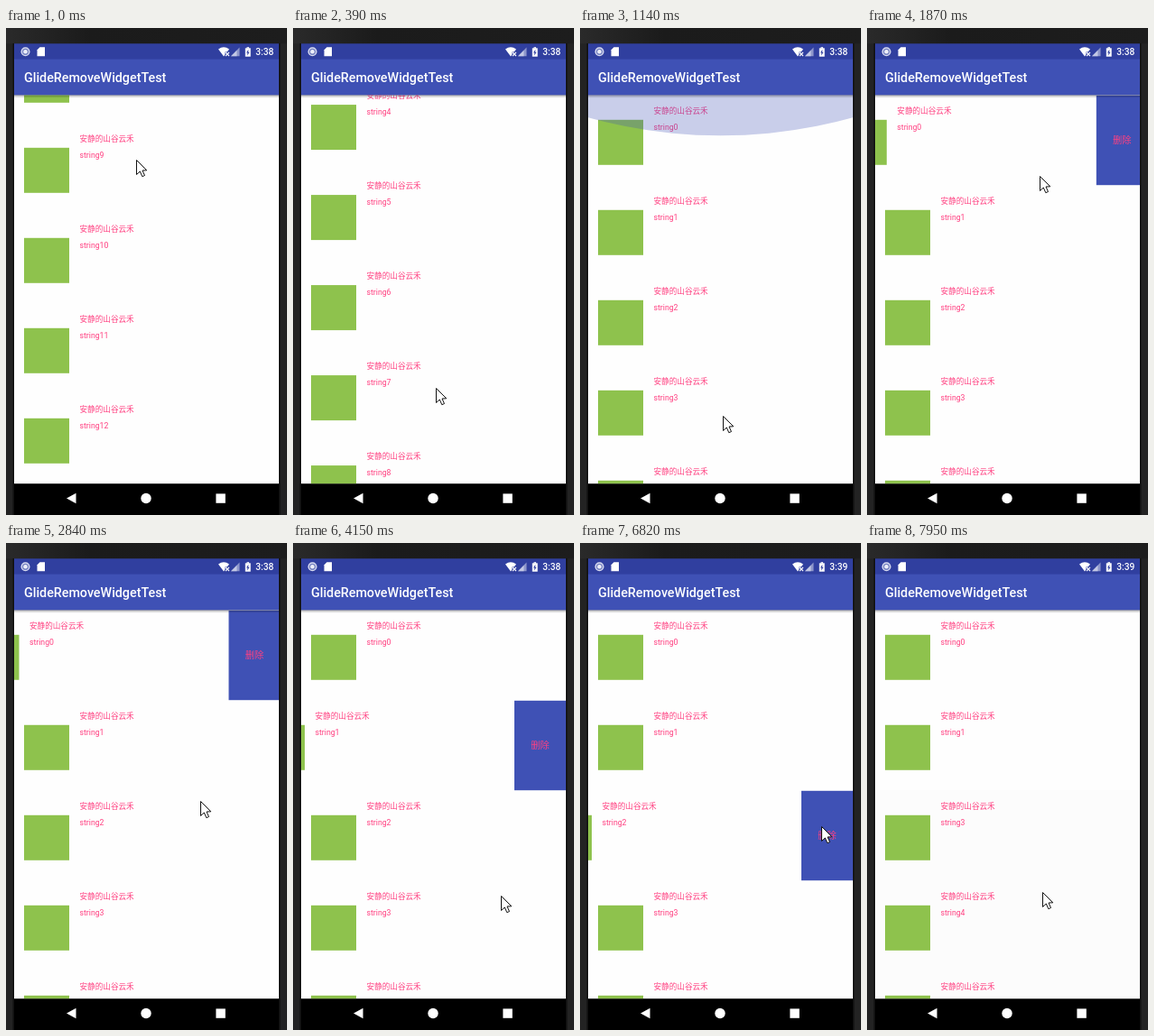
Animation of 311 by 540 pixels, one loop 8000 ms. Source, as an HTML page with a canvas:

```html
<!DOCTYPE html>
<html lang="zh">
<head>
<meta charset="utf-8">
<style>
html, body { margin: 0; width: 100%; height: 100%; overflow: hidden; background: #1d1d1d; }
canvas { display: block; }
</style>
</head>
<body>
<canvas id="stage" width="311" height="540"></canvas>
<script>
const ctx = document.getElementById('stage').getContext('2d');
const LOOP = 8000;
const LEFT = 9, WIDTH = 293, RIGHT = LEFT + WIDTH;
const STATUS_TOP = 17.3, BAR_TOP = 34.6, LIST_TOP = 74.3, NAV_TOP = 505.4;
const ROW = 100, PANEL = 57;
const INDIGO = '#3f51b5', DARK_INDIGO = '#303f9f', PINK = '#ff4081', WHITE = '#fff';
const LATIN = 'Roboto, sans-serif';
const CJK = '"Noto Sans CJK SC", "Noto Sans CJK", sans-serif';

// Bursts of activity: first refresh, last refresh, number of refreshes.
const BURSTS = [[150, 1140, 9], [1290, 1420, 2], [1720, 2150, 4], [2450, 3380, 8],
  [3530, 4150, 6], [4430, 5420, 8], [5540, 6510, 7], [7410, 7950, 5]];

// Turning points of the pointer: time, x, y.
const POINTER = [[0, 144, 146], [390, 158, 400], [650, 165, 154], [1140, 158, 430],
  [1420, 240, 150], [2150, 165, 171], [2840, 215, 286], [3380, 245, 225],
  [3780, 2, 240], [4150, 230, 391], [5000, 225, 141], [5420, 250, 310],
  [5860, 150, 320], [6510, 267, 314], [7680, 267, 314], [7950, 194, 387]];

// Per row: opening starts, opening ends, closing starts.
const SWIPES = [[1420, 2010, 2810], [3380, 3780, 4430], [5420, 5860, Infinity]];
const CLOSE_TIME = 400;

const mix = (a, b, k) => a + (b - a) * k;

function ease(t, from, to) {
  const k = Math.min(1, Math.max(0, (t - from) / (to - from)));
  return k * k * (3 - 2 * k);
}

function holdTime(time) {
  const burst = BURSTS.filter(b => b[0] <= time).pop();
  if (!burst) return 0;
  const [start, end, count] = burst;
  const step = (end - start) / (count - 1);
  return Math.min(end, start + Math.floor((time - start) / step + 0.12) * step);
}

function pointerAt(t) {
  const i = POINTER.findIndex(key => key[0] >= t);
  if (i <= 0) return POINTER[0].slice(1);
  const [t0, x0, y0] = POINTER[i - 1], [t1, x1, y1] = POINTER[i];
  const k = ease(t, t0, t1);
  return [mix(x0, x1, k), mix(y0, y1, k)];
}

function scrollAt(t) {
  return t < 660 ? mix(869, 202, ease(t, 0, 640)) : 202 * (1 - ease(t, 660, 1020));
}

function swipeAt(row, t) {
  if (!SWIPES[row]) return 0;
  const [start, end, close] = SWIPES[row];
  return PANEL * (t < close ? ease(t, start, end) : 1 - ease(t, close, close + CLOSE_TIME));
}

function rect(x, y, w, h, color) {
  ctx.fillStyle = color;
  ctx.fillRect(x, y, w, h);
}

function shape(points, fill, stroke) {
  ctx.beginPath();
  for (const [x, y] of points) ctx.lineTo(x, y);
  ctx.closePath();
  ctx.fillStyle = fill;
  ctx.fill();
  if (stroke) {
    ctx.strokeStyle = stroke;
    ctx.lineWidth = 1;
    ctx.stroke();
  }
}

function disc(x, y, r, color) {
  ctx.beginPath();
  ctx.arc(x, y, r, 0, Math.PI * 2);
  ctx.fillStyle = color;
  ctx.fill();
}

function text(str, x, y, font, color) {
  ctx.font = font;
  ctx.fillStyle = color;
  ctx.fillText(str, x, y);
}

function drawRow(n, y, swipe) {
  const x = -swipe;
  rect(20 + x, y + 27.5, 50, 50, '#8ec24d');
  text('安静的山谷云禾', 81.5 + x, y + 20.6, '300 8.6px ' + CJK, PINK);
  text('string' + n, 81.5 + x, y + 38.4, '8.7px ' + LATIN, PINK);
  if (swipe > 0) {
    rect(RIGHT + x, y + 0.5, PANEL, ROW - 0.6, INDIGO);
    text('删除', RIGHT + x + 18.2, y + 53.5, '300 10.3px ' + CJK, PINK);
  }
}

function drawList(t) {
  const scroll = scrollAt(t);
  const gap = ROW * ease(t, 7400, 7820);
  ctx.save();
  ctx.beginPath();
  ctx.rect(LEFT, LIST_TOP, WIDTH, NAV_TOP - LIST_TOP);
  ctx.clip();
  rect(LEFT, 74, WIDTH, 432, '#fefefe');
  if (gap > 0) rect(LEFT, LIST_TOP + 2 * ROW, WIDTH, 240, '#fcfcfc');

  for (let n = 0; n < 14; n++) {
    const y = LIST_TOP + n * ROW - scroll - (n > 2 ? gap : 0);
    if (y < LIST_TOP - ROW || y > NAV_TOP) continue;
    ctx.globalAlpha = n === 2 ? 1 - ease(t, 7300, 7500) : 1;
    drawRow(n, y, swipeAt(n, t));
  }
  ctx.globalAlpha = 1;

  const glow = 45 * ease(t, 900, 1140) * (1 - ease(t, 1140, 1420));
  if (glow > 0) disc(155.5, LIST_TOP + glow - 546, 546, 'rgba(63,81,181,0.28)');

  const shadow = ctx.createLinearGradient(0, LIST_TOP, 0, LIST_TOP + 3.5);
  shadow.addColorStop(0, 'rgba(0,0,0,0.3)');
  shadow.addColorStop(1, 'rgba(0,0,0,0)');
  rect(LEFT, LIST_TOP, WIDTH, 3.5, shadow);
  ctx.restore();
}

function drawWifi() {
  ctx.beginPath();
  ctx.moveTo(241, 31.5);
  ctx.lineTo(235, 23.5);
  ctx.quadraticCurveTo(241, 18.8, 247, 23.5);
  ctx.fillStyle = WHITE;
  ctx.fill();
  rect(242.5, 26.5, 5, 5, DARK_INDIGO);
  ctx.beginPath();
  ctx.moveTo(243, 27);
  ctx.lineTo(247, 31);
  ctx.moveTo(247, 27);
  ctx.lineTo(243, 31);
  ctx.strokeStyle = WHITE;
  ctx.lineWidth = 1.1;
  ctx.stroke();
}

function drawStatus(clock) {
  disc(21.5, 26.3, 5, '#d9dcf0');
  disc(21.5, 26.3, 3.6, '#7480c0');
  disc(21.5, 26.3, 2.3, '#eceef8');
  shape([[37.5, 21.3], [43, 21.3], [43, 31.3], [34.5, 31.3], [34.5, 24.3]], WHITE);
  drawWifi();
  shape([[249, 31.3], [258.5, 31.3], [258.5, 21.5]], '#8d96cb');
  shape([[249, 31.3], [255.5, 31.3], [255.5, 24.7]], '#c3c8e5');
  rect(264.8, 22.3, 5.9, 9.4, WHITE);
  rect(266.5, 21.2, 2.5, 1.5, WHITE);
  shape([[268.4, 23.7], [266, 27.5], [267.4, 27.5], [267.1, 30.5],
    [269.5, 26.7], [268.1, 26.7]], DARK_INDIGO);
  text(clock, 276.2, 30.3, '500 10.2px ' + LATIN, WHITE);
}

function drawBars(clock) {
  rect(LEFT, STATUS_TOP, WIDTH, 18, DARK_INDIGO);
  rect(LEFT, BAR_TOP, WIDTH, LIST_TOP - BAR_TOP, INDIGO);
  text('GlideRemoveWidgetTest', 20, 60, '500 14.3px ' + LATIN, WHITE);
  drawStatus(clock);
  rect(LEFT, NAV_TOP, WIDTH, 35, '#000');
  shape([[67, 521.5], [77.5, 515.7], [77.5, 527.3]], WHITE);
  disc(155, 521.5, 5.7, WHITE);
  rect(232.4, 516.4, 10.4, 10.4, WHITE);
}

function drawBezel() {
  const top = ctx.createLinearGradient(0, 0, 311, 0);
  top.addColorStop(0, '#2a2a2a');
  top.addColorStop(0.3, '#1b1b1b');
  top.addColorStop(1, '#1d1d1d');
  rect(0, 0, 311, 540, '#232323');
  rect(0, 0, 311, STATUS_TOP, top);
  rect(LEFT - 1.5, 17, 1.5, 523, '#111');
  rect(RIGHT, 17, 1.5, 523, '#111');
}

function drawPointer(t) {
  const [x, y] = pointerAt(t);
  ctx.save();
  ctx.translate(Math.round(x) + 0.5, Math.round(y) + 0.5);
  shape([[0, 0], [0, 16], [3.8, 12.5], [6.3, 18.2], [9, 17], [6.5, 11.5], [11.3, 11.3]],
    WHITE, '#111');
  ctx.restore();
}

function render() {
  const time = performance.now() % LOOP;
  const t = holdTime(time);
  drawBezel();
  drawList(t);
  drawBars(time < 6820 ? '3:38' : '3:39');
  drawPointer(t);
  requestAnimationFrame(render);
}
render();
</script>
</body>
</html>
```
